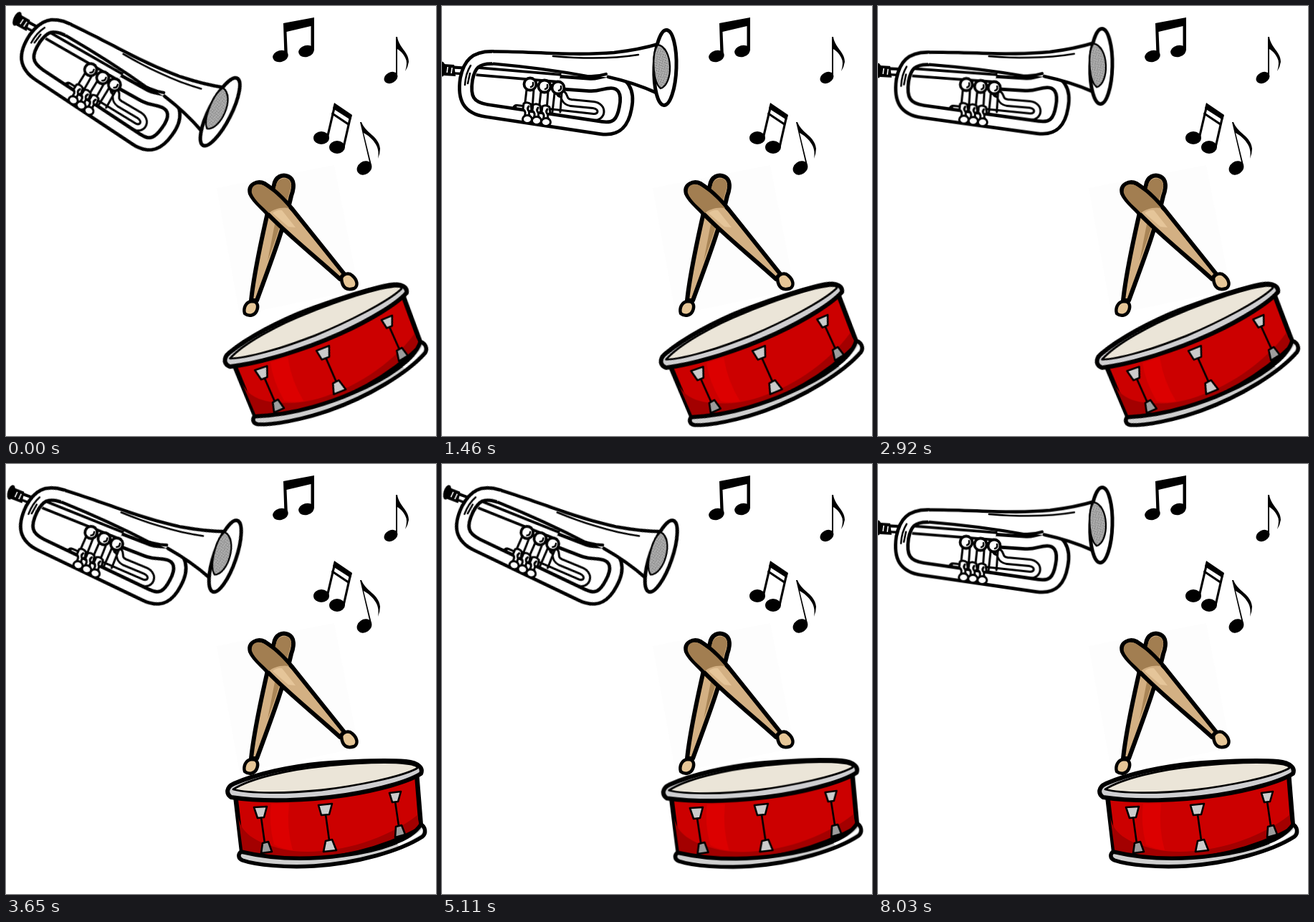
Write an HTML page that moves like this. It is 600 px wide and 600 px high and loops after 8.76 s.

```html
<!DOCTYPE html>
<html lang="en">
<head>
<meta charset="utf-8">
<title>Flugelhorn and drum</title>
<style>
html, body { margin: 0; width: 100%; height: 100%; overflow: hidden; background: #fff; }
svg { display: block; width: 100%; height: 100%; }
.ink { stroke: #000; stroke-linecap: round; stroke-linejoin: round; }
.line { fill: none; }
#horn { transform-origin: 166px 88px; animation: horn 8760ms step-end infinite; }
#drum { transform-origin: 453px 489px; animation: drum 8760ms step-end infinite; }
@keyframes horn {
  0% { transform: rotate(25deg); }
  8.3333% { transform: rotate(19.2deg); }
  16.6667% { transform: rotate(0deg); }
  25% { transform: rotate(27.5deg); }
  33.3333% { transform: rotate(-.7deg); }
  41.6667% { transform: rotate(17deg); }
  50% { transform: rotate(26.8deg); }
  58.3333% { transform: rotate(17deg); }
  66.6667% { transform: rotate(15deg); }
  75% { transform: rotate(0deg); }
  83.3333% { transform: rotate(28deg); }
  91.6667%, 100% { transform: rotate(-.3deg); }
}
@keyframes drum {
  0% { transform: rotate(-15.6deg); }
  8.3333% { transform: rotate(0deg); }
  16.6667% { transform: rotate(-16.2deg); }
  25% { transform: rotate(0deg); }
  33.3333% { transform: rotate(-16.2deg); }
  41.6667% { transform: rotate(0deg); }
  50% { transform: rotate(-16.2deg); }
  58.3333% { transform: rotate(-.6deg); }
  66.6667% { transform: rotate(-13deg); }
  75% { transform: rotate(0deg); }
  83.3333% { transform: rotate(-13deg); }
  91.6667%, 100% { transform: rotate(0deg); }
}
</style>
</head>
<body>
<svg viewBox="0 0 600 600">
  <defs>
    <pattern id="mesh" width="3" height="3" patternUnits="userSpaceOnUse" patternTransform="rotate(25)">
      <rect width="3" height="3" fill="#d8d8d8"/>
      <path d="M0 0L3 3M0 3L3 0" stroke="#555" stroke-width=".7"/>
    </pattern>
    <path id="loop" d="M72 72C46 71 38 82 34 102C30 129 37 142 62 146L222 170C243 173 252 164 256 142C261 118 251 106 236 106C223 106 218 111 206 110L164 107"/>
    <path id="slide" d="M165 122C173 122 167 133 180 135L211 138C226 140 224 156 211 155L104 143"/>
    <g id="valve">
      <path class="ink line" d="M-5 8L-8 34M5 8L3 34" stroke-width="3"/>
      <circle class="ink" r="8.5" fill="#fff" stroke-width="3.8"/>
      <path class="ink line" d="M1 4Q5 3 4 -2" stroke-width="2.5"/>
    </g>
    <g id="cap" class="ink" fill="#fff" stroke-width="3">
      <path d="M-5 -15Q0 -18 5 -14L6 -6Q0 -3 4 4L-4 4Q-1 -4 -6 -7Z"/>
      <ellipse cx="0" cy="7" rx="6.5" ry="5.5"/>
      <path class="line" d="M2 -11Q-1 -7 3 -3"/>
    </g>
  </defs>

  <!-- music notes -->
  <g>
    <path d="M387 24L430 16V62H425.5V28L391.5 36L393 70H388.5Z"/>
    <ellipse cx="383" cy="70" rx="11" ry="8" transform="rotate(-15 383 70)"/>
    <ellipse cx="419" cy="63" rx="11" ry="8" transform="rotate(-15 419 63)"/>

    <path d="M544 43H546C548 58 562 64 562 78Q561 85 557 91Q561 79 557 72Q553 64 546 60V98H544Z"/>
    <ellipse cx="537" cy="100" rx="10" ry="7.5" transform="rotate(-28 537 100)"/>

    <path class="line" d="M459 138L448 185M481 153L471 197" stroke="#000" stroke-width="3.2"/>
    <path d="M458 135L483 152L481 159L456 143ZM455 148L479 164L478 167L454 151Z"/>
    <ellipse cx="440" cy="184" rx="11" ry="9"/>
    <ellipse cx="462" cy="197" rx="11" ry="9"/>

    <path d="M494 162H496C502 178 520 181 522 199Q522 206 519 213Q521 201 516 193Q510 183 499 177L510 222H508Z"/>
    <ellipse cx="500" cy="226" rx="11" ry="9" transform="rotate(-35 500 226)"/>
  </g>

  <!-- drumsticks -->
  <path d="M294 254L458 222L492 396L326 431Z" fill="#fdfdfd"/>
  <g class="ink" stroke-width="6">
    <path d="M374 250C376 238 386 234 394 238C403 242 402 254 398 265C388 310 367 364 350 411L342 411C347 364 362 300 374 250Z" fill="#d3b083"/>
    <path d="M377 250C379 238 399 236 398 252L389 282L369 276Z" fill="#a27e51" stroke="none"/>
    <path d="M387 292L376 326L365 356L377 294Z" fill="#a98556" stroke="none"/>
    <path d="M343 412C334 413 331 422 333 429C339 434 347 432 350 425C353 417 350 412 343 412Z" fill="#e6c697" stroke-width="4.5"/>
    <path d="M341 262C337 249 351 243 361 248C377 258 389 271 400 284L472 374L466 381C432 350 394 320 365 290C356 280 345 272 341 262Z" fill="#d3b083"/>
    <path d="M343 261C341 250 352 246 360 251C374 259 385 270 395 282C384 280 372 284 367 289C358 279 347 272 343 261Z" fill="#a27e51" stroke="none"/>
    <path d="M372 289Q378 284 385 285L404 309L394 308Z" fill="#e5c599" stroke="none"/>
    <path d="M468 380C470 374 478 371 483 376C490 382 492 390 486 394C477 397 469 395 468 380Z" fill="#e6c697" stroke-width="4.5"/>
  </g>

  <!-- drum -->
  <g id="drum" class="ink">
    <path d="M320 462L330 548Q460 570 579 506L573 432Z" fill="#c00" stroke-width="6.5"/>
    <path d="M324 492C328 514 344 527 388 538C440 548 520 532 574 490L577 506Q470 564 331 545Z" fill="#a30000" stroke="none"/>
    <path d="M370 474H395Q391 508 400 539Q384 537 374 531Q366 500 370 474Z" fill="#dc0000" stroke="none"/>
    <path d="M328 541C324 544 323 550 330 553C350 560 390 563 430 561C490 557 550 540 581 520C587 515 585 506 579 503C565 525 520 540 470 546C420 553 370 551 328 541Z" fill="#cfcfcf" stroke-width="5.5"/>
    <path d="M546 530Q568 522 581 509Q583 514 577 518Q563 527 548 533Z" fill="#fff" stroke="none"/>
    <path d="M314 465C307 460 307 451 318 446C350 432 398 422 440 418C480 415 530 413 558 415C577 417 582 425 579 432C562 443 520 455 474 462C420 470 360 472 314 465Z" fill="#cfcfd1" stroke-width="6"/>
    <path d="M317 454C340 439 396 426 440 422C480 418 530 415 558 418C571 419 576 423 573 425C550 437 490 449 440 455C390 460 340 460 317 454Z" fill="#ebe5d8" stroke-width="2.8"/>
    <g stroke-width="2.6">
      <path class="line" d="M356 493L361 529M446 489L451 525M543 471L548 505"/>
      <path d="M346 479L364 478L360 493L351 494ZM436 476L455 474L451 489L440 490ZM535 459L551 457L547 471L539 472ZM446 526L455 524L461 539L443 541Z" fill="#cbcbcb"/>
      <path d="M358 529L366 527L371 541L356 543ZM544 506L552 504L557 517L543 521Z" fill="#9d9d9d"/>
    </g>
  </g>

  <!-- flugelhorn -->
  <g id="horn">
    <path class="ink line" d="M10 89L38 91" stroke-width="12"/>
    <path d="M17 90L38 91" stroke="#fff" stroke-width="4.5"/>
    <ellipse cx="0" cy="88" rx="5" ry="10.5"/>
    <path d="M3 81L17 82L19 98L3 97Z"/>
    <path d="M8 85L7 93M14 86L13 94" stroke="#fff" stroke-width="1.6"/>

    <path class="line" d="M48 91L166 101" stroke="#000" stroke-width="14"/>
    <path d="M48 91L166 101" stroke="#fff" stroke-width="6.5"/>

    <use href="#slide" class="ink line" stroke-width="12"/>
    <use href="#slide" class="line" stroke="#fff" stroke-width="6"/>

    <use href="#loop" class="line" stroke="#000" stroke-width="22"/>
    <use href="#loop" class="line" stroke="#fff" stroke-width="12.5"/>
    <path d="M70 64C120 63 180 70 240 66Q275 63 302 54L299 121Q268 106 235 100L205 97L70 81Z" fill="#fff"/>
    <path class="ink line" d="M72 63.5C120 63 180 70 240 65Q275 61 302 53M299 121Q268 107 232 99" stroke-width="4.7"/>
    <path class="ink line" d="M72 80.6C110 84 165 91 203 98Q216 99 229 95" stroke-width="4.2"/>
    <path class="ink line" d="M155 70Q224 76 274 68" stroke-width="2.5"/>
    <path class="ink line" d="M40 83Q33 94 32 110M39 94L36 108" stroke-width="2.5"/>

    <ellipse class="ink" cx="311.5" cy="86" rx="15.5" ry="52.5" fill="#fff" stroke-width="5" transform="rotate(2 311 86)"/>
    <path class="ink" d="M301 54C323 58 323 110 305 115C294 106 292 67 301 54Z" fill="url(#mesh)" stroke-width="2.3"/>

    <use href="#valve" x="123" y="109"/>
    <use href="#valve" x="143" y="112"/>
    <use href="#valve" x="162" y="114"/>
    <use href="#cap" x="119" y="151"/>
    <use href="#cap" x="132" y="153"/>
    <use href="#cap" x="145" y="155"/>
  </g>
</svg>
</body>
</html>
```
